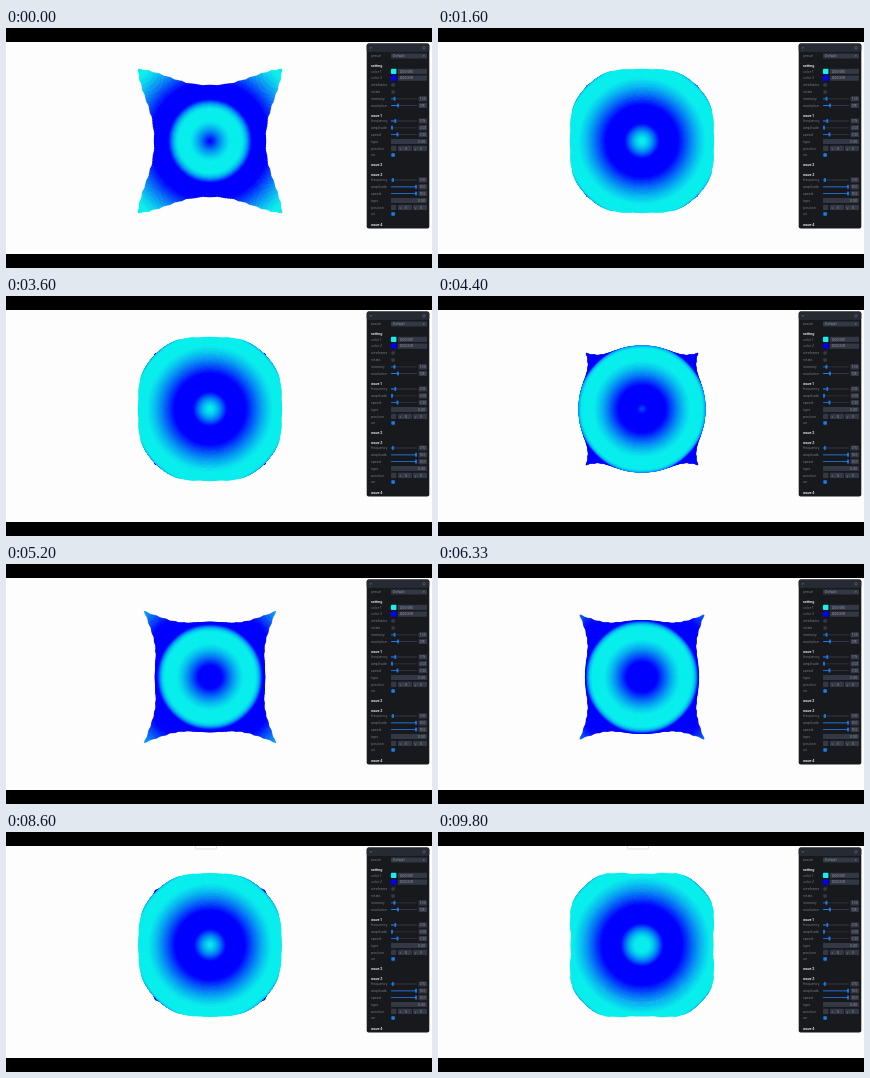
These frames come from a looping animation (426 by 240 pixels, 9870 ms). An HTML page with a canvas:

```html
<!DOCTYPE html>
<html lang="en">
<head>
<meta charset="utf-8">
<title>Radial wave</title>
<style>
html, body { margin: 0; width: 100%; height: 100%; overflow: hidden; background: #000; }
canvas, svg { position: absolute; left: 0; top: 0; width: 426px; height: 240px; display: block; }
text { font-family: Inter, sans-serif; }
</style>
</head>
<body>
<canvas id="view"></canvas>
<svg id="ui" viewBox="0 0 426 240">
  <rect id="hint" x="189.5" y="13" width="21" height="4" rx="1" fill="#fff" stroke="#d2d2d2" stroke-width=".7"/>
  <rect width="426" height="14"/>
  <rect y="226" width="426" height="14"/>
  <g id="panel"></g>
</svg>
<script>
const LOOP = 9870, FPS = 15;
const CX = 204, CY = 113;
const HALF = 61.6, WAVE = 64, LIFT = 0.14;
// seconds, wave cycles
const PACE = [[0, .355], [8.6, 8.925], [9.87, 10.08]];

const view = document.getElementById('view');
const ctx = view.getContext('2d');
const hint = document.getElementById('hint');
const dpr = Math.max(1, window.devicePixelRatio || 1);
view.width = 426 * dpr;
view.height = 240 * dpr;

function cycles(t) {
  const i = t < PACE[1][0] ? 1 : 2;
  const [t0, a] = PACE[i - 1], [t1, b] = PACE[i];
  return a + (b - a) * (t - t0) / (t1 - t0);
}

function shade(h) {
  const k = Math.min(1, Math.max(0, 0.37 + 0.7 * h));
  return `rgb(${8 * k},${238 * k},${255 - 19 * k})`;
}

// One ring of the square sheet; beyond the half width only corner arcs remain.
function ring(r, scale) {
  const p = r * scale;
  ctx.beginPath();
  if (r <= HALF) {
    ctx.arc(CX, CY, p, 0, 2 * Math.PI);
  } else {
    const edge = Math.min(r, HALF + 0.25 * Math.sin(r * 1.4));
    const cut = Math.acos(edge / r);
    if (cut >= Math.PI / 4) return;
    for (let q = 0; q < 4; q++) {
      const a = q * Math.PI / 2 + cut, b = (q + 1) * Math.PI / 2 - cut;
      ctx.moveTo(CX + p * Math.cos(a), CY + p * Math.sin(a));
      ctx.arc(CX, CY, p, a, b);
    }
  }
  ctx.stroke();
}

// Rings are painted from the lowest to the highest, so crests cover troughs.
function drawSheet(phase) {
  const rings = [];
  for (let r = 0.4; r < HALF * Math.SQRT2; r += 0.4) {
    rings.push([r, Math.cos(2 * Math.PI * (r / WAVE - phase))]);
  }
  rings.sort((a, b) => a[1] - b[1]);
  ctx.lineWidth = 1.3;
  for (const [r, h] of rings) {
    ctx.strokeStyle = shade(h);
    ring(r, 1 / (1 - LIFT * h));
  }
}

function buildPanel() {
  const parts = [];
  const FIELD = '#343844', BLUE = '#1a7cf0', DIM = '#747a88', VALUE = '#9298a6';
  const box = (x, y, w, h, fill, rx = .7) =>
    parts.push(`<rect x="${x}" y="${y}" width="${w}" height="${h}" rx="${rx}" fill="${fill}"/>`);
  const label = (x, y, s, fill = DIM, size = 3.4, weight = 400) =>
    parts.push(`<text x="${x}" y="${y + 1.2}" font-size="${size}" font-weight="${weight}" fill="${fill}">${s}</text>`);

  const head = (y, s) => label(365, y, s, '#e8e8ea', 3.3, 700);
  const field = (y, name, value) => {
    label(365, y, name);
    box(385, y - 2.6, 36, 5.2, FIELD);
    label(387, y, value, VALUE);
  };
  const color = (y, name, fill, value) => {
    label(365, y, name);
    box(385, y - 2.6, 5.4, 5.2, fill);
    box(392, y - 2.6, 29, 5.2, FIELD);
    label(394, y, value, VALUE);
  };
  const check = (y, name, on) => {
    label(365, y, name);
    box(385.3, y - 1.8, 3.6, 3.6, on ? BLUE : FIELD);
  };
  const slider = (y, name, x, value) => {
    label(365, y, name);
    box(385, y - .4, 26, .8, FIELD, .3);
    box(385, y - .4, x - 385, .8, BLUE, .3);
    box(x - .9, y - 2, 1.8, 4, BLUE);
    box(412.5, y - 2.6, 8.5, 5.2, FIELD);
    label(413.8, y, value, VALUE, 3);
  };
  const vector = y => {
    label(365, y, 'position');
    box(385, y - 2.6, 5.4, 5.2, FIELD);
    for (const x of [392, 407]) {
      box(x, y - 2.6, 14, 5.2, FIELD);
      label(x + 1.5, y, x < 400 ? 'x' : 'y');
      label(x + 7, y, '0', VALUE);
    }
  };
  const wave = (y, n, knobs, values) => {
    head(y, 'wave ' + n);
    ['frequency', 'amplitude', 'speed'].forEach((s, i) =>
      slider(y + 5 + i * 6.8, s, knobs[i], values[i]));
    field(y + 25.5, 'type', '');
    label(412, y + 25.5, '0.00', VALUE);
    vector(y + 32.3);
    check(y + 39, 'on', true);
  };

  box(360.7, 15.5, 62.6, 185, '#17191c', 2);
  box(360.7, 15.5, 62.6, 8.5, '#262a33', 2);
  label(364, 20, '▾');
  parts.push(`<circle cx="418" cy="19.8" r="1.3" fill="none" stroke="${DIM}" stroke-width=".5"/>`);
  field(28, 'preset', 'Default');
  label(417, 28, '▾');
  head(38, 'setting');
  color(43.3, 'color 1', '#12f0f0', '#00f0f0');
  color(50.1, 'color 2', '#0000ff', '#0000ff');
  check(57, 'wireframe', false);
  check(64, 'rotate', false);
  slider(70.8, 'intensity', 388.5, '1.00');
  slider(77.5, 'resolution', 392, '128');
  wave(88, 1, [389.3, 386, 391.5], ['0.15', '0.02', '0.25']);
  head(137, 'wave 2');
  wave(147, 3, [387, 410, 410], ['0.10', '10.0', '10.0']);
  head(196.3, 'wave 4');
  document.getElementById('panel').innerHTML = parts.join('');
}

function draw(ms) {
  const t = Math.floor(ms * FPS / 1000 + 1e-6) / FPS;
  ctx.setTransform(dpr, 0, 0, dpr, 0, 0);
  ctx.fillStyle = '#fdfdfd';
  ctx.fillRect(0, 0, 426, 240);
  drawSheet(cycles(t));
  hint.style.display = t >= 8 ? '' : 'none';
}

buildPanel();
const start = performance.now();
function tick() {
  draw((performance.now() - start) % LOOP);
  requestAnimationFrame(tick);
}
tick();
</script>
</body>
</html>
```
